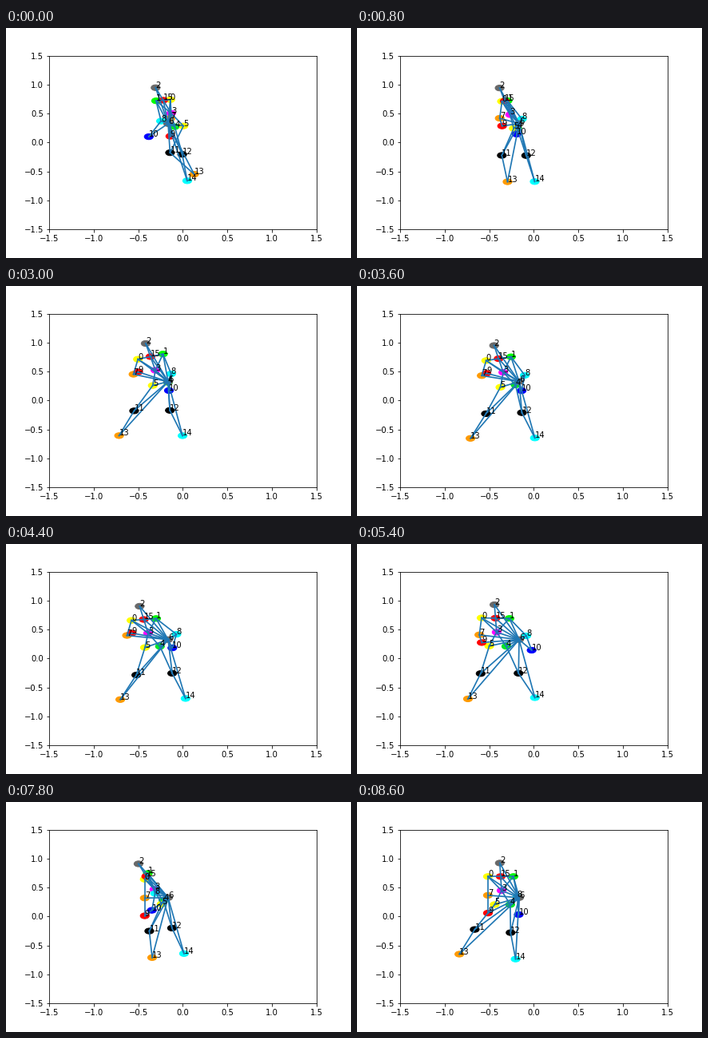
Animation of 432 by 288 pixels, one loop 8.8 s. Source, as a matplotlib script:

```python
import numpy as np
import matplotlib.pyplot as plt
from matplotlib.animation import FuncAnimation
from matplotlib.patches import Circle

plt.rcParams.update({"font.family": "DejaVu Sans", "font.size": 10})

FRAMES, INTERVAL = 44, 200
ROOT = 6
ROOT_POS = (-0.165, 0.325)
SPINE, THIGH, SHIN, UPPER_ARM = 0.485, 0.485, 0.46, 0.355

COLORS = ["yellow", "lime", "dimgray", "magenta", "#00e628", "yellow",
          "dimgray", "#ff9a00", "cyan", "red", "blue", "black",
          "black", "#ff9a00", "cyan", "red"]
BONES = [(2, 15), (15, 0), (15, 1), (0, 7), (7, 9), (1, 8), (8, 10),
         (15, 3), (0, 3), (1, 3), (3, 4), (3, 5),
         (4, 12), (12, 14), (5, 11), (11, 13)]
EDGES = BONES + [(ROOT, j) for j in range(len(COLORS)) if j != ROOT]


def glide(frame, keys):
    """Value at a frame, moving evenly from key to key."""
    return np.interp(frame, list(keys), list(keys.values()))


def limb(length, degrees):
    """Bone vector, measured from straight down, positive to the right."""
    angle = np.radians(degrees)
    return length * np.array([np.sin(angle), -np.cos(angle)])


def pose(frame):
    def at(keys):
        return glide(frame, keys)

    joints = np.zeros((len(COLORS), 2))
    joints[ROOT] = ROOT_POS

    # Torso: the body turns, so the shoulder line narrows and flips.
    hips = np.array([
        at({0: -.042, 8: -.37, 15: -.252, 32: -.468, 39: -.228, 43: -.352}),
        at({0: .278, 8: .212, 15: .285, 22: .198, 39: .243, 43: .205})])
    neck_x = at({0: -.22, 8: -.432, 15: -.363, 22: -.438, 39: -.41, 43: -.372})
    lean = neck_x - hips[0]
    spine = np.array([lean, np.sqrt(SPINE**2 - lean**2)])
    neck = hips + spine
    shoulder = np.array([
        at({0: -.08, 8: .143, 22: .138, 32: .175, 39: .017, 43: .143}),
        at({0: -.01, 15: .045, 32: -.025, 39: .05, 43: 0})])
    joints[15] = neck
    joints[3] = hips + spine / 2
    joints[2] = neck + 0.48 * spine
    joints[0], joints[1] = neck - shoulder, neck + shoulder
    joints[5], joints[4] = hips - 0.61 * shoulder, hips + 0.61 * shoulder

    # One arm is lifted towards the viewer, then lowered.
    lift = at({0: 0, 8: 1, 22: 1, 32: 0})
    joints[7] = joints[0] + (-0.05 * lift, -0.325 + 0.065 * lift)
    joints[9] = joints[7] + (0.053 * lift, -0.307 + 0.347 * lift)

    # The other arm swings sideways.
    swing = at({0: 9, 8: 45, 15: 15, 22: 40, 43: 7})
    forearm = at({0: -27, 8: 1, 22: -11, 32: 38, 39: -7, 43: 3})
    joints[8] = joints[1] + limb(UPPER_ARM, swing)
    joints[10] = joints[8] + limb(0.32 - 0.002 * swing, forearm)

    # Both thighs sway together; the shins follow the steps.
    sway = at({0: 1, 8: 5, 15: -6.5, 22: 7.5, 32: 7.5, 39: 2.5, 43: -8.5})
    joints[11] = joints[5] + limb(THIGH, sway - 19)
    joints[12] = joints[4] + limb(THIGH, sway + 9)
    joints[13] = joints[11] + limb(
        SHIN, at({0: 36, 8: -20, 22: -23, 32: -13, 39: 4, 43: -22}))
    joints[14] = joints[12] + limb(
        SHIN, at({0: 7, 8: 17, 22: 19, 32: 28, 39: 17, 43: 7}))
    return joints


fig, ax = plt.subplots(figsize=(6, 4), dpi=72, facecolor="white")
fig.subplots_adjust(left=0.125, right=0.9, bottom=0.125, top=0.88)
ax.set(xlim=(-1.5, 1.5), ylim=(-1.5, 1.5))
ticks = np.arange(-1.5, 1.6, 0.5)
ax.set_xticks(ticks)
ax.set_yticks(ticks)

nodes = [ax.add_patch(Circle((0, 0), 0.05, color=c)) for c in COLORS]
nodes[ROOT].set_zorder(1.5)
lines = [ax.plot([], [], color="C0", lw=1.7)[0] for _ in EDGES]
labels = [ax.text(0, 0, str(j)) for j in range(len(COLORS))]


def update(frame):
    joints = pose(frame)
    for node, label, point in zip(nodes, labels, joints):
        node.center = tuple(point)
        label.set_position(point)
    for line, (a, b) in zip(lines, EDGES):
        line.set_data(joints[[a, b], 0], joints[[a, b], 1])
    return nodes + lines + labels


anim = FuncAnimation(fig, update, frames=FRAMES, interval=INTERVAL,
                     repeat=True, repeat_delay=0)
plt.show()
```
